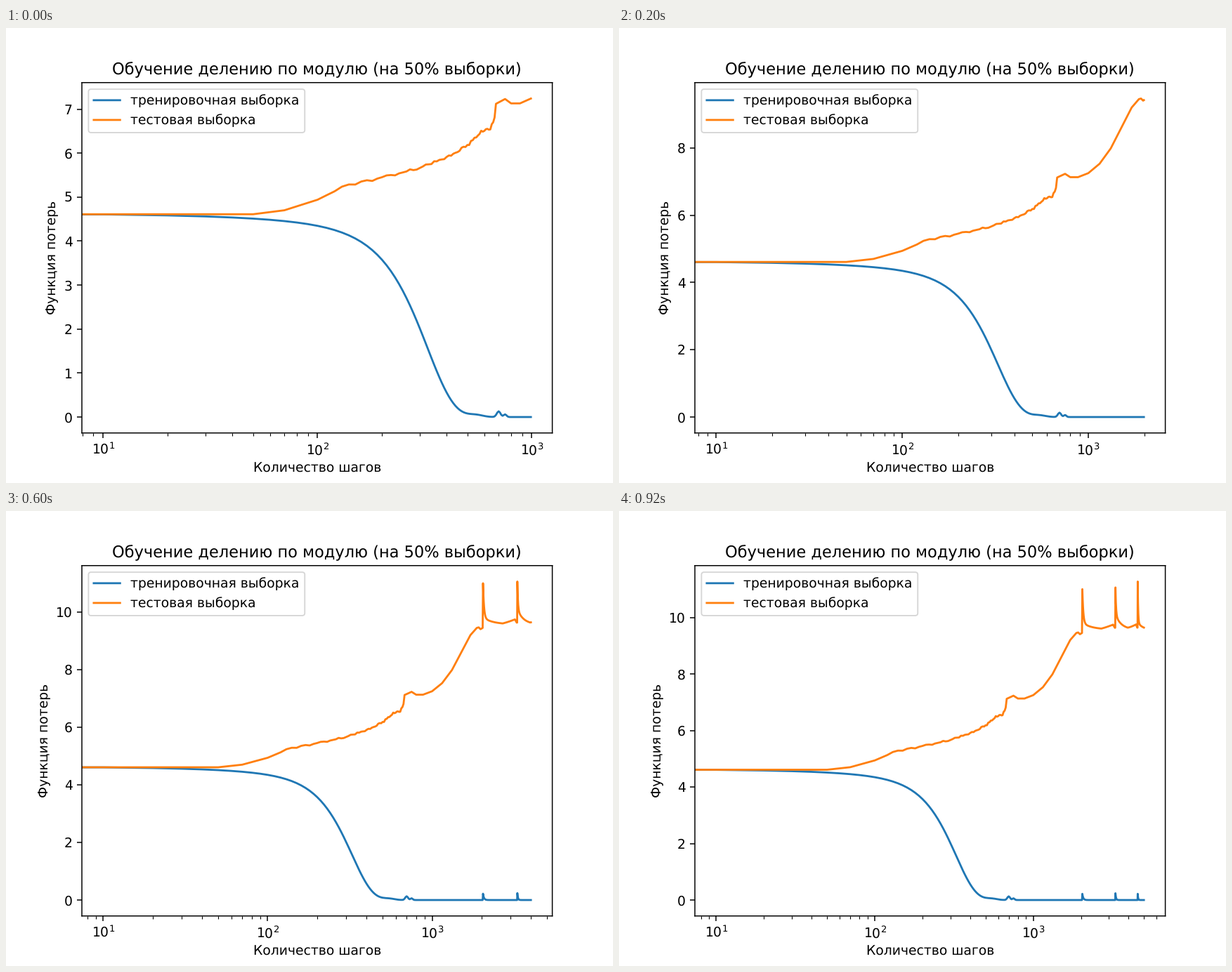
Write a matplotlib script that moves like this. It is 864 by 648 pixels and loops after 1 s.

```python
import numpy as np
import matplotlib.pyplot as plt
from matplotlib.animation import FuncAnimation

STEP = 10              # steps between two loss readings
CHUNK = 1000           # steps added by each frame
FRAMES = 5
FIRST_SPIKE, PERIOD = 2040, 1260

# Smooth, unsnapped outlines and letters
plt.rcParams.update({"path.snap": False, "text.hinting": "no_hinting"})

steps = np.arange(0, FRAMES * CHUNK, STEP)
cycle, phase = np.divmod(steps - FIRST_SPIKE, PERIOD)
spiking = cycle >= 0


def bump(center, height, width):
    return height * np.exp(-((steps - center) / width) ** 2 / 2)


def decay(heights, length):
    """A sudden rise at each spike, followed by an exponential fall."""
    height = np.take(heights, np.maximum(cycle, 0))
    return np.where(spiking, height * np.exp(-phase / length), 0)


def train_loss():
    u = steps / 100
    learning = 4.63 * np.exp(-0.05 * u - 0.0132 * u ** 3.59)
    bumps = bump(545, 0.05, 45) + bump(700, 0.13, 14) + bump(750, 0.06, 12)
    return learning + bumps + decay([0.22, 0.24, 0.22], 28)


def test_loss():
    rise = [(10, 4.61), (50, 4.61), (70, 4.7), (100, 4.94), (130, 5.22),
            (200, 5.44), (300, 5.66), (400, 5.9), (500, 6.17), (580, 6.48),
            (640, 6.55), (670, 6.81), (680, 7.12), (750, 7.23), (800, 7.13),
            (880, 7.13), (1000, 7.25), (1150, 7.53), (1320, 7.985),
            (1710, 9.2), (1870, 9.45), (1920, 9.468), (1970, 9.405),
            (2030, 9.45)]
    knots, losses = zip(*rise)
    growth = np.interp(np.log(np.maximum(steps, 1)), np.log(knots), losses)
    noise = np.random.default_rng(4).uniform(-0.03, 0.03, steps.size)
    growth += np.where((steps > 100) & (steps < 670), noise, 0)

    plateau = np.interp(phase, [0, 650, 1150, 1230, 1250],
                        [9.58, 9.58, 9.74, 9.63, 9.63])
    plateau += decay([0.22, 0.5, 0.25], 300) + decay([1.2, 0.98, 1.44], 28)
    return np.where(spiking, plateau, growth)


curves = {"тренировочная выборка": train_loss(),
          "тестовая выборка": test_loss()}
fig, ax = plt.subplots(figsize=(6.4, 4.8), dpi=135)


def draw(frame):
    count = (frame + 1) * CHUNK // STEP
    ax.clear()
    for label, losses in curves.items():
        ax.plot(steps[:count], losses[:count], label=label)
    ax.set_xscale("log")
    ax.set_title("Обучение делению по модулю (на 50% выборки)")
    ax.set_xlabel("Количество шагов")
    ax.set_ylabel("Функция потерь")
    ax.legend(loc="upper left").get_frame().set_snap(False)


animation = FuncAnimation(fig, draw, frames=FRAMES, interval=200,
                          init_func=lambda: None, repeat=True, repeat_delay=0)
plt.show()
```
